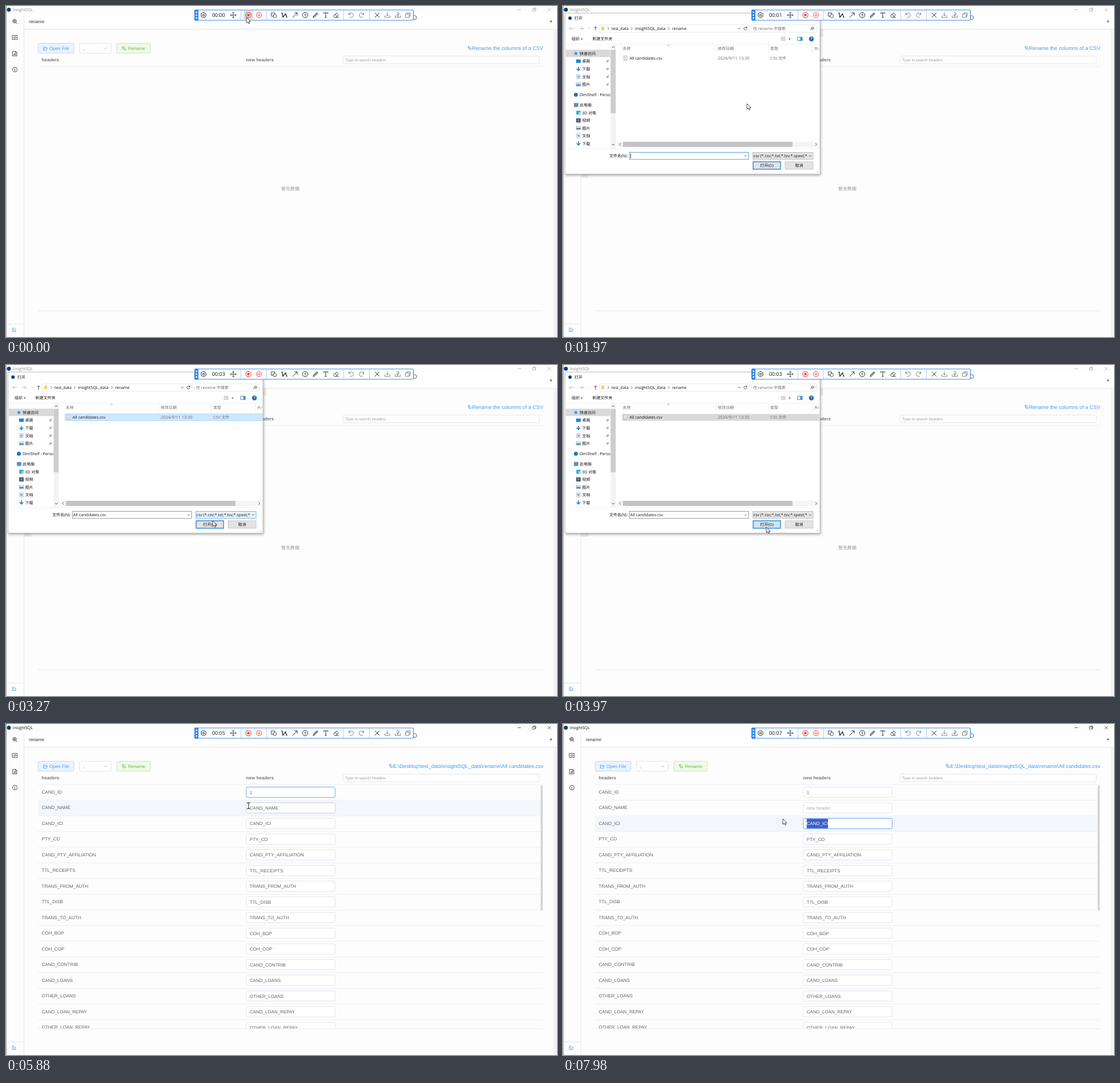
Recreate the animation shown at these times as an HTML page. Size 965x580 px, loop 8000 ms.

```html
<!DOCTYPE html>
<html lang="en">
<head>
<meta charset="utf-8">
<title>Rename columns</title>
<style>
html, body { margin: 0; width: 100%; height: 100%; overflow: hidden; background: #fdfdfd; }
svg { display: block; width: 965px; height: 580px; }
text { text-rendering: geometricPrecision; white-space: pre; }
.app { font: 8px "Liberation Sans", Arial, "Noto Sans CJK SC", sans-serif; fill: #606266; }
.bold { font-weight: 700; fill: #777a80; }
.link { font-size: 9.1px; fill: #4a98f7; text-anchor: end; }
.hint { font-size: 6.85px; fill: #9a9da3; }
.ui { font: 7px "Open Sans", "Noto Sans CJK SC", "Noto Sans CJK", sans-serif; fill: #111; }
.dim { fill: #6d6d6d; }
.clock { font-size: 9px; }
.ico { fill: none; stroke-linecap: round; stroke-linejoin: round; }
</style>
</head>
<body>
<svg id="stage" viewBox="0 0 965 580"></svg>
<script>
const LOOP = 8000;
const HEADERS = ["CAND_ID", "CAND_NAME", "CAND_ICI", "PTY_CD", "CAND_PTY_AFFILIATION", "TTL_RECEIPTS",
  "TRANS_FROM_AUTH", "TTL_DISB", "TRANS_TO_AUTH", "COH_BOP", "COH_COP", "CAND_CONTRIB", "CAND_LOANS",
  "OTHER_LOANS", "CAND_LOAN_REPAY", "OTHER_LOAN_REPAY"];
const ROW_TOP = 106, ROW_H = 27.47;
const BLUE = "#4a98f7", DARK = "#333", RED = "#ee4b3c";

// pointer moves: start, end, number of jumps, x, y
const MOVES = [
  [180, 940, 8, 89, 75], [1340, 1340, 1, 89, 78], [1620, 1620, 1, 186, 128],
  [1840, 1970, 2, 322, 171], [2070, 2580, 6, 150, 90], [2760, 3270, 5, 362, 273],
  [3470, 3470, 1, 358, 283], [3570, 3750, 3, 356, 284], [4360, 4360, 1, 357, 278],
  [4540, 4540, 1, 310, 181], [4710, 4710, 1, 450, 113], [4870, 4870, 1, 477, 113],
  [5000, 5130, 2, 491, 119], [5270, 5600, 4, 404, 141], [5880, 6100, 3, 484, 150],
  [6250, 6470, 3, 384, 158], [6670, 6800, 2, 472, 169], [6930, 7130, 3, 482, 190],
  [7240, 7360, 2, 484, 176], [7500, 7840, 4, 380, 168], [7980, 7980, 1, 385, 166]
];

// edited fields: focus start, focus end, drag end, time the text is replaced, new text
const EDITS = [
  [5270, 6250, 5600, 5880, "1"],
  [6250, 7500, 6470, 7100, ""],
  [7500, 8000, 7840, 9000, ""]
];

const rect = (x, y, w, h, fill, stroke = "none", more = "") =>
  `<rect x="${x}" y="${y}" width="${w}" height="${h}" fill="${fill}" stroke="${stroke}" ${more}/>`;
const line = (x1, y1, x2, y2, c = "#ebeef5", w = 1) =>
  `<path d="M${x1} ${y1}L${x2} ${y2}" stroke="${c}" stroke-width="${w}"/>`;
const text = (x, y, s, cls = "ui", more = "") => `<text x="${x}" y="${y}" class="${cls}" ${more}>${s}</text>`;
const icon = (x, y, d, c = DARK, w = 0.9, more = "") =>
  `<path class="ico" transform="translate(${x} ${y})" d="${d}" stroke="${c}" stroke-width="${w}" ${more}/>`;
const dot = (x, y, r, fill, stroke = "none", w = 1) =>
  `<circle cx="${x}" cy="${y}" r="${r}" fill="${fill}" stroke="${stroke}" stroke-width="${w}"/>`;
const group = (id, s, more = "") => `<g id="${id}" ${more}>${s}</g>`;
const ring = r => `M${-r} 0a${r} ${r} 0 1 1 ${2 * r} 0a${r} ${r} 0 1 1 ${-2 * r} 0`;

const HEX = "M0-4.7L4.1-2.3V2.3L0 4.7-4.1 2.3V-2.3Z";
const PEN = "M-3-2.6L-.8-3 3.2 2 1 3-2 1.6ZM-3-2.6L1 3";
const DOWN = "M-2-1L0 1 2-1", RIGHT = "M-1-2L1 0-1 2", LEFT = "M1-2L-1 0 1 2", UP = "M-2 1L0-1 2 1";
const FOLDER = "M-3.3 2.8V-2.6H-.9L0-1.6H2.5V-.3M-3.3 2.8L-2-.3H3.8L2.5 2.8Z";

function windowFrame() {
  return rect(0, 0, 965, 580, "#fdfdfd") +
    rect(32, 14, 933, 26, "#fff") + line(32, 40.5, 965, 40.5, "#e9e9eb") + line(32, 41.5, 965, 41.5, "#f5f5f6") +
    rect(959, 41, 6, 539, "#f4f4f6") + line(31.5, 14, 31.5, 580, "#e6e6e8") +
    line(0, 557, 31, 557, "#e6e6e8") + line(0.5, 0, 0.5, 580, "#a0a0a0") +
    dot(5, 6.5, 3.5, "#0c3c78") + text(12, 9, "InsightSQL", "ui", 'id="title"') +
    group("controls", '<path class="ico" d="M896.5 6.5h5M922.5 5h4v4h-4zM924 5V3.5h4v4h-1.5M949 4l5 5M954 4l-5 5" stroke-width=".7"/>') +
    text(40, 30, "rename", "app", 'style="fill:#333"') +
    icon(954.5, 27, HEX, "#222", 1, 'style="scale:.75"') + icon(954.5, 27, ring(1.2), "#222") +
    icon(15, 26.5, ring(3.2) + "M2.4 2.4L4.6 4.6M-1.6 0H1.6M0-1.6V1.6", DARK) +
    icon(15.5, 55, "M-4.2-3.5H4.2V3.5H-4.2ZM-1.4-1.4L-2.7 0-1.4 1.4M1.4-1.4L2.7 0 1.4 1.4M.5-1.6L-.5 1.6", DARK, 0.8) +
    icon(15.5, 83.5, "M-3.5-4H1.3L3.5-1.8V4H-3.5ZM1.3-4V-1.8H3.5M-1.6 2.3V.5M0 2.3V-1M1.6 2.3V0", DARK, 0.8) +
    icon(15.5, 111.5, ring(4) + "M0-.3V2.2M0-1.9V-1.8", DARK, 0.9) +
    icon(14, 567.5, "M-3.5-2.7H1M-3.5 0H0M-3.5 2.7H3.5M2-1.3L3.5-.2 2 .9", BLUE, 1);
}

function page() {
  return group("open", rect(56.3, 65.3, 62.5, 17.4, "", "", 'rx="2" stroke-width=".8"') +
      icon(68.8, 74.2, FOLDER, "", 0.7) + text(76, 77, "Open File", "app")) +
    rect(128.5, 65.4, 55.8, 17.3, "#fff", "#dcdfe6", 'rx="2" stroke-width=".8"') +
    text(135, 77, ",", "app") + icon(174, 74.2, "M-2.6-1.3L0 1.3 2.6-1.3", "#a8abb2", 0.8) +
    rect(194, 65.3, 58.7, 17.4, "#f0f8eb", "#c3e3b3", 'rx="2" stroke-width=".8"') +
    icon(207, 74, PEN, "#6fba49", 0.8) + text(213.8, 77, "Rename", "app", 'style="fill:#6fba49"') +
    text(62.6, 97, "headers", "app bold") + text(420.6, 97, "new headers", "app bold") +
    rect(590.4, 87.8, 343.6, 13.2, "#fff", "#dcdfe6", 'rx="2" stroke-width=".8"') +
    text(594, 96.5, "Type to search headers", "app hint") +
    line(56, 106, 940, 106) + line(56, 534, 940, 534, "#e6e8ee") +
    group("empty", text(482, 323, "暂无数据", "app", 'style="fill:#909399"') +
      icon(812.5, 73.5, PEN, BLUE, 0.8) + text(941, 76.9, "Rename the columns of a CSV", "app link"));
}

function table() {
  const rows = HEADERS.map((h, i) => {
    const y = ROW_TOP + i * ROW_H;
    return rect(56, y, 884, ROW_H, "none", "none", `id="row${i}"`) + line(56, y + ROW_H, 940, y + ROW_H) +
      text(62.6, y + 16, h, "app") +
      rect(420.8, y + 4.5, 155.6, 18, "#fff", "#dcdfe6", `id="box${i}" rx="2" stroke-width=".8"`) +
      rect(427, y + 5.2, 0, 16.6, "#3d5fc6", "none", `id="sel${i}"`) +
      text(426.8, y + 16.5, h, "app", `id="val${i}"`);
  }).join("");
  return group("table", `<clipPath id="view"><rect x="56" y="106" width="885" height="427.5"/></clipPath>` +
    `<g clip-path="url(#view)">${rows}</g>` +
    rect(936.4, 107.5, 3.6, 219.5, "#d3d4d8", "none", 'id="bar" rx="1.8"') +
    icon(674.5, 73.5, PEN, BLUE, 0.8) +
    text(941, 76.9, "E:\\Desktop\\test_data\\insightSQL_data\\rename\\All candidates.csv", "app link"));
}

function navItem(y, label, kind, x = 33.5) {
  const ix = x - 6.5;
  const art = {
    desk: rect(ix - 4, y - 3, 8, 6, "#1b87d6"),
    down: icon(ix, y, "M0-3V2.5M-2.6 0L0 2.8 2.6 0", "#2f86dc", 1.8),
    doc: rect(ix - 3, y - 3.6, 6, 7.2, "#eef4f9", "#8a9aa8", 'stroke-width=".6"') + rect(ix - 1.5, y - 1.5, 3, 3, "#5b9bd0"),
    pic: rect(ix - 4, y - 2.8, 8, 5.6, "#dcecf7", "#8a9aa8", 'stroke-width=".6"') + rect(ix - 3.4, y - 0.3, 6.8, 2.5, "#4a86b0"),
    cloud: dot(ix, y, 3.5, "#1478d0"),
    pc: rect(ix - 3, y - 3, 7, 4.8, "#3a9be0", "#667", 'stroke-width=".6"') + line(ix - 3, y + 3, ix + 4, y + 3, "#778"),
    cube: rect(ix - 3.6, y - 3.4, 7.2, 6.8, "#22a9c9") + rect(ix, y - 1, 3.6, 4.4, "#8fe0ee"),
    film: rect(ix - 3.8, y - 3.6, 7.6, 7.2, "#3b4660") + rect(ix - 2, y - 2.6, 4, 5, "#5f83b8"),
    star: icon(ix, y, "M0-2.8L.9-.9 2.9-.6 1.4.8 1.8 2.8 0 1.8-1.8 2.8-1.4.8-2.9-.6-.9-.9Z", "#2f86dc", 0.6, 'style="fill:#3b97e8"')
  };
  return art[kind] + text(x, y + 2.5, label);
}

function dialog() {
  const pin = y => icon(78, y, "M-2 2L0 0M-1.5-.7L.8 1.6M-.7-.4L1-2 2.2-.8.5.8", "#667", 0.8);
  const nav = rect(5, 76.5, 78, 13, "#d9d9d9") + navItem(83, "快速访问", "star", 29) +
    navItem(96.7, "桌面", "desk") + navItem(110.3, "下载", "down") + navItem(124, "文档", "doc") +
    navItem(137.5, "图片", "pic") + [96.7, 110.3, 124, 137.5].map(pin).join("") +
    navItem(155.5, "DimShelf - Personal", "cloud", 29) + navItem(173.5, "此电脑", "pc", 29) +
    navItem(187, "3D 对象", "cube") + navItem(200.5, "视频", "film") + navItem(214, "图片", "pic") +
    navItem(227.5, "文档", "doc") + navItem(241, "下载", "down");
  const address = icon(15, 39.5, "M3.3 0H-3.3M-.8-2.5L-3.3 0-.8 2.5", "#b4b4b4") +
    icon(32, 39.5, "M-3.3 0H3.3M.8-2.5L3.3 0 .8 2.5", "#b4b4b4") + icon(45.5, 39.5, "M-1-.5L0 .5 1-.5", "#aaa", 0.7) +
    icon(57, 39.5, "M0 3.3V-3.3M-2.5-.8L0-3.3 2.5-.8", "#444") +
    rect(64, 33, 262.5, 13, "#fff", "#dedede", 'stroke-width=".7"') + rect(67.3, 36, 4.6, 6.6, "#f6cf62") +
    [79.5, 120.5, 185.5].map(x => icon(x, 39.5, RIGHT, "#444", 0.8)).join("") +
    text(85, 41.7, "test_data") + text(126, 41.7, "insightSQL_data", "ui", 'style="font-size:7.15px"') + text(191, 41.7, "rename") +
    icon(308.5, 39.5, DOWN, "#333", 0.8) + icon(319.5, 39.5, "M2.2-1.6A2.7 2.7 0 1 0 2.7.4M2.5-3V-1.2H.7", "#333", 0.8) +
    rect(330, 33, 113.5, 13, "#fff", "#dedede", 'stroke-width=".7"') + text(333, 41.7, "在 rename 中搜索", "ui dim") +
    icon(436.5, 38.8, "M-.9.9L-3 3M-1 0a1.9 1.9 0 1 1 3.8 0a1.9 1.9 0 1 1-3.8 0", "#333", 0.9);
  const tools = text(15, 60.2, "组织") + icon(33, 57.8, "M-1.2-.5H1.2L0 .8Z", "#222", 0.5, 'style="fill:#222"') +
    text(51.5, 60.2, "新建文件夹") +
    icon(385.5, 57.5, "M-3.5-2.5H-2M-3.5 0H-2M-3.5 2.5H-2M-.5-2.5H3.5M-.5 0H3.5M-.5 2.5H3.5", "#888", 0.9) +
    icon(397, 57.8, "M-1.2-.5H1.2L0 .8Z", "#222", 0.5, 'style="fill:#222"') +
    rect(411, 54.7, 8, 6, "#fff", "#2f7fc4", 'stroke-width=".9"') + rect(415.5, 55, 3.5, 5.5, "#3d8fd6") +
    dot(435, 57.7, 4.2, "#1464ad") + text(433.6, 60.3, "?", "ui", 'style="fill:#fff;font-weight:700"');
  const list = text(104.8, 77.4, "名称", "ui dim") + icon(184.5, 69, UP, "#777", 0.7) + text(271, 77.4, "修改日期", "ui dim") +
    text(363, 77.4, "类型", "ui dim") + `<svg x="439" y="68" width="9.5" height="14">${text(0.5, 9.4, "大小", "ui dim")}</svg>` +
    [268, 359.5, 436.5].map(x => line(x, 67, x, 82, "#e8e8e8", 0.8)).join("") +
    rect(103.3, 85.7, 345.5, 12, "", "", 'id="file" stroke-width=".7"') +
    rect(106.5, 87.4, 5.6, 8, "#f5f5f5", "#9a9a9a", 'stroke-width=".6"') + line(107.6, 90, 111, 90, "#aaa", 0.6) +
    line(107.6, 92, 111, 92, "#aaa", 0.6) + line(107.6, 94, 111, 94, "#aaa", 0.6) +
    text(116.6, 94, "All candidates.csv") + text(271, 94, "2024/9/11 13:30", "ui dim", 'style="font-size:7.35px"') +
    text(363, 94, "CSV 文件", "ui dim");
  const bars = rect(83.5, 67, 9, 183, "#f3f3f3") + rect(83.5, 77, 8.7, 111, "#cdcdcd") +
    icon(88, 72, UP, "#444") + icon(88, 243, DOWN, "#444") +
    rect(95, 237.8, 353, 9.4, "#f5f5f5") + rect(105, 238, 297, 9, "#c4c4c4") + icon(99.8, 242.5, LEFT, "#444") + icon(443.5, 242.5, RIGHT, "#444");
  const foot = text(81, 265.2, "文件名(N):") + rect(116.3, 256.4, 208.7, 12.4, "#fff", "", 'id="name" stroke-width=".9"') +
    text(117.8, 265.2, "All candidates.csv", "ui", 'id="chosen"') + group("caret", line(118.5, 258.5, 118.5, 267, "#111", 0.8)) +
    icon(320, 262.8, "M-1.7-.8L0 .9 1.7-.8", "#444", 0.8) +
    rect(332.4, 256.4, 105.6, 12.4, "", "", 'id="types" stroke-width=".8"') +
    `<svg x="333" y="256" width="95" height="13">${text(0.6, 9.2, "csv (*.csv;*.txt;*.tsv;*.spext;*.dat)")}</svg>` +
    icon(433, 262.8, "M-1.7-.8L0 .9 1.7-.8", "#444", 0.8) +
    rect(333, 273, 48, 13, "", "#1a7fd4", 'id="ok" stroke-width="1.3"') + text(357, 282, "打开(O)", "ui", 'text-anchor="middle"') +
    rect(389, 273, 49, 13, "#e3e3e3", "#b4b4b4", 'stroke-width=".7"') + text(413.5, 282, "取消", "ui", 'text-anchor="middle"') +
    dot(446.5, 291.5, 0.5, "#999") + dot(444.5, 291.5, 0.5, "#999") + dot(446.5, 289.5, 0.5, "#999");
  return group("dialog", rect(450, 40.5, 6, 13, "#ececee") + rect(31, 293, 13.5, 8, "#ececee") +
    rect(3.5, 12.5, 446.5, 282, "#fff", "#b9b9b9", 'stroke-width=".8" style="filter:drop-shadow(1px 2px 2px #0005)"') +
    dot(12.3, 21.3, 3, "#0c3c78") + text(20, 24, "打开") + address + tools + line(4, 67, 449, 67, "#ececec", 0.8) +
    `<svg width="83.3" height="249">${nav}</svg>` + list + bars + line(4, 250, 449, 250, "#f0f0f0", 0.8) + foot);
}

function recorder() {
  const grey = "#777";
  return rect(330.5, 7, 383, 18, "#fff", "#3b8ae6", 'rx="1.5" stroke-width="1.2"') +
    rect(330, 6.5, 7, 19, "#2f86ee", "none", 'rx="1.5"') + [11, 16, 21].map(y => rect(332.3, y - 1.2, 2.5, 2.4, "#fff")).join("") +
    [411.5, 456.5, 591.5, 636.5].map(x => line(x, 8, x, 24.4, "#a9c9ee", 0.9)).join("") +
    rect(416, 8, 17, 16.5, "#dedede", "none", 'id="stop" rx="1"') +
    icon(346, 16, HEX, DARK, 1) + icon(346, 16, ring(1.7), DARK, 1) +
    text(360.7, 19.3, "00:00", "ui clock", 'id="clock"') +
    icon(398, 16, "M-5 0H5M0-5V5M-3.6-1.4L-5 0-3.6 1.4M3.6-1.4L5 0 3.6 1.4M-1.4-3.6L0-5 1.4-3.6M-1.4 3.6L0 5 1.4 3.6", DARK, 0.9) +
    icon(424.5, 16, ring(4.6), RED, 1.1) + rect(422.5, 14, 4, 4, RED) +
    icon(443, 16, ring(4.6), RED, 1) + icon(443, 16, "M-1.2-1.8V1.8M1.2-1.8V1.8", RED, 1.1) +
    icon(469, 16, "M-1.5 2H-4.5V-4H1.5V-2M-1.4 1.5a3 3 0 1 1 6 0a3 3 0 1 1-6 0", DARK) +
    icon(487.5, 16, "M-4-3.5L-2.5 3.5 2-2 4 3.5M-4.7-3.5H-3.3M-3.2 3.5H-1.8M1.3-2H2.7M3.3 3.5H4.7", DARK, 1.3) +
    icon(506, 16, "M-4 4L4-4M-.5-4H4V.5", DARK, 1) +
    icon(524, 16, ring(4.7) + "M-1-1.4L.2-2.3V2.4", DARK, 1) +
    icon(542, 16, "M-4 4L-3.2 1.4 2.4-4.2 4.2-2.4-1.4 3.2ZM-2.6 2.2L3-3", DARK, 1) +
    icon(560, 16, "M-3.8-2.8V-4H3.8V-2.8M0-4V4M-1.2 4H1.2", DARK, 1) +
    icon(578, 16, "M-4.5 1.5L1-4 4.5-.5 0 4H-2ZM-2-1L2 2.2M0 4H4.5", DARK, 0.9) +
    icon(604.5, 16, "M-4-4V-1H-1M-4-1A4 4 0 1 1-2 3.6", grey) + icon(622.5, 16, "M4-4V-1H1M4-1A4 4 0 1 0 2 3.6", grey) +
    icon(650, 16, "M-3.8-3.8L3.8 3.8M3.8-3.8L-3.8 3.8", DARK, 1) +
    icon(668, 16, "M-4.5 1V4H4.5V1M0-4.5V1.2M-2.3-1L0 1.2 2.3-1", grey) +
    icon(686, 16, "M-4.5 1V4.2H4.5V1M-1.5-4.2H2V-1L0 1.2-2-1H2M-1.5 2.2H1.5", grey) +
    icon(704, 16, "M-4-2H2V4H-4ZM-2-2V-4H4V2H2", grey);
}

const pointer = group("arrow", '<path d="M0 0V10L2.4 7.9 4 11.2 5.6 10.5 4.1 7.3H7.2Z" fill="#fff" stroke="#222" stroke-width=".8" stroke-linejoin="round"/>') +
  group("hand", '<path d="M1.5 7V1.2Q1.5 0 2.4 0T3.3 1.2V4.6L6.8 5.4Q7.8 5.8 7.7 7L7 11.3H2.8L.2 7.8Q-.4 6.6.6 6.5Z" fill="#fff" stroke="#222" stroke-width=".8"/>') +
  group("beam", '<path class="ico" d="M-2.6-5H2.6M-2.6 5H2.6M0-5V5" stroke="#222" stroke-width="1"/>');

document.getElementById("stage").innerHTML = windowFrame() + page() + table() + dialog() + recorder() + pointer;
const $ = id => document.getElementById(id);
const show = (id, on) => $(id).setAttribute("visibility", on ? "visible" : "hidden");
const paint = (el, fill, stroke) => { el.setAttribute("fill", fill); el.setAttribute("stroke", stroke); };

function cursorAt(t) {
  let x = 421, y = 20;
  for (const [from, to, n, tx, ty] of MOVES) {
    if (t < from) break;
    const k = n > 1 ? Math.min(n, 1 + Math.floor((t - from) / (to - from) * (n - 1) + 1e-6)) : 1;
    const p = k / n, e = p * p * (3 - 2 * p);
    x += (tx - x) * e;
    y += (ty - y) * e;
  }
  return [x, y];
}

function drawField(i, t, hover) {
  const [from, to, dragEnd, typeAt, typed] = EDITS[i];
  const focus = t >= from && t < to, done = t >= typeAt;
  const value = done ? typed : HEADERS[i], el = $("val" + i), sel = $("sel" + i);
  $("box" + i).setAttribute("stroke", focus ? BLUE : hover ? "#c0c4cc" : "#dcdfe6");
  el.textContent = value || "new header";
  el.style.fill = value ? "" : "#a8abb2";
  sel.setAttribute("width", 0);
  if (!focus || done) return;
  const len = el.getComputedTextLength();
  const part = (426.8 + len - cursorAt(Math.min(t, dragEnd))[0]) / len;
  const n = Math.round(Math.max(0, Math.min(1, part)) * value.length);
  if (!n) return;
  const keep = value.slice(0, value.length - n);
  el.innerHTML = `${keep}<tspan fill="#fff">${value.slice(keep.length)}</tspan>`;
  const start = keep ? el.getSubStringLength(0, keep.length) : 0;
  sel.setAttribute("x", 426.8 + start);
  sel.setAttribute("width", len - start);
}

function render(t) {
  const [x, y] = cursorAt(t);
  const loaded = t >= 4130, asking = t >= 1840 && !loaded;
  const onOpen = t < 1840 && x < 119 && x > 56 && y > 65 && y < 84;
  const onField = t >= 4600 && x > 420 && x < 577;
  const active = loaded || (t >= 1340 && t < 1470);

  $("clock").textContent = "00:0" + Math.max(0, Math.floor((t - 90) / 1000));
  $("title").style.fill = active ? "#111" : "#8c8c8c";
  $("controls").setAttribute("stroke", active ? "#222" : "#a0a0a0");
  $("controls").setAttribute("fill", "none");
  show("stop", t < 180);
  show("empty", !loaded);
  show("table", loaded);
  show("dialog", asking);

  const [box, folder, label] = $("open").children;
  paint(box, onOpen ? "#5a9cf8" : "#ecf3fc", onOpen ? "#5a9cf8" : "#b3d3fa");
  const ink = onOpen ? "#fff" : "#559bf3";
  folder.setAttribute("stroke", ink);
  label.style.fill = ink;

  const picked = t >= 2580, over = t >= 2370;
  paint($("file"), t >= 3970 ? "#d9d9d9" : picked ? "#cce8ff" : over ? "#e5f3ff" : "none", picked && t < 3970 ? "#99d1ff" : "none");
  $("name").setAttribute("stroke", picked ? "#8a8a8a" : "#3f97de");
  show("chosen", asking && picked);
  show("caret", asking && !picked);
  const onTypes = t >= 3130 && t < 3470;
  paint($("types"), onTypes ? "#e5f1fb" : "#e3e3e3", onTypes ? "#5fa8e0" : "#b4b4b4");
  $("ok").setAttribute("fill", t >= 3970 ? "#cce4f7" : t >= 3470 ? "#e5f1fb" : "#e3e3e3");

  show("bar", loaded && t >= 4540);
  const row = t >= 4540 ? Math.floor((y - ROW_TOP) / ROW_H) : -1;
  HEADERS.forEach((h, i) => $("row" + i).setAttribute("fill", i === row ? "#f3f6fa" : "none"));
  EDITS.forEach((e, i) => drawField(i, t, onField && i === row));

  const kind = onOpen ? "hand" : onField ? "beam" : "arrow";
  for (const id of ["arrow", "hand", "beam"]) {
    show(id, id === kind);
    $(id).setAttribute("transform", `translate(${x} ${y})`);
  }
}

const begin = performance.now();
function tick() {
  render((performance.now() - begin) % LOOP);
  requestAnimationFrame(tick);
}
tick();
</script>
</body>
</html>
```
